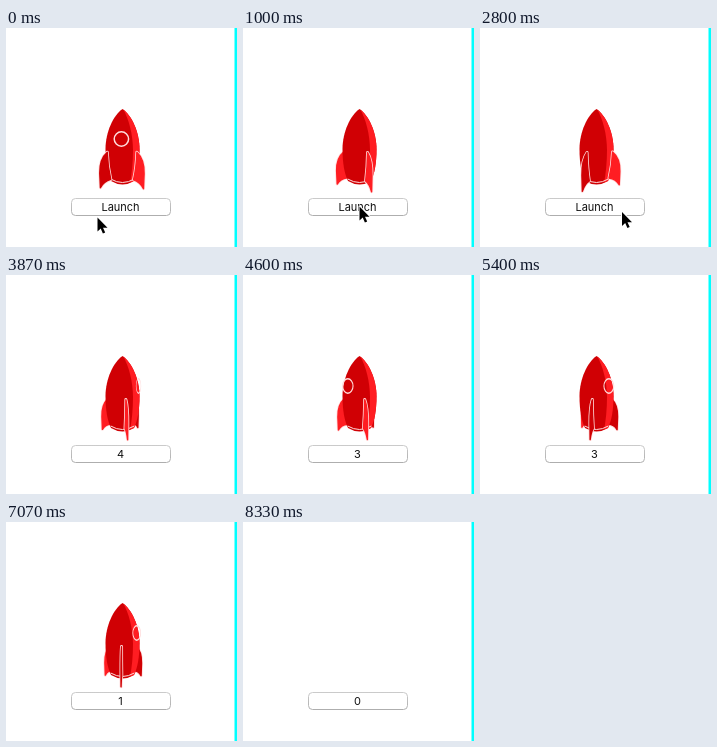
An HTML page with a canvas for the animation above (9340 ms loop, 231 by 219 pixels).

```html
<!DOCTYPE html>
<html>
<head>
<meta charset="utf-8">
<style>
html, body { margin: 0; width: 100%; height: 100%; overflow: hidden; background: #fff; }
canvas { display: block; }
</style>
</head>
<body>
<canvas id="stage" width="231" height="219"></canvas>
<script>
const ctx = document.getElementById('stage').getContext('2d');
const LOOP = 9340, FPS = 15;
const CX = 116.5, EYE = 120, DEPTH = 121;
const DARK = '#d00004', BRIGHT = '#ff1d22', EDGE = '#ffdcdc';
const SPIN = 1.625, SPIN_LAG = 0.118;
const PRESS = 2.42, CLICK = 2.55, LIFTOFF = 7.55, GONE = 8.33;

// cubic-bezier(.42, 0, .58, 1)
function easeInOut(x) {
  let lo = 0, hi = 1, s = 0.5;
  for (let i = 0; i < 24; i++) {
    s = (lo + hi) / 2;
    const bx = 3 * (1 - s) * (1 - s) * s * 0.42 + 3 * (1 - s) * s * s * 0.58 + s * s * s;
    if (bx < x) lo = s; else hi = s;
  }
  return s * s * (3 - 2 * s);
}

function spinAngle(t) {
  const u = (((t - SPIN_LAG) / SPIN) % 1 + 1) % 1;
  return easeInOut(u) * 2 * Math.PI;
}

// Perspective view of a point at radius r, height y, turned by a
function project(r, y, a) {
  const s = 1 / (1 - r * Math.cos(a) / DEPTH);
  return [CX + r * Math.sin(a) * s, EYE + (y - EYE) * s];
}

function drawFin(a) {
  const p = (r, y) => project(r, y, a);
  const facing = Math.sin(a) > 0 ? -Math.cos(a) : Math.cos(a);
  const color = facing < 0.15 ? BRIGHT : DARK;
  ctx.beginPath();
  ctx.moveTo(...p(16, 124));
  ctx.quadraticCurveTo(...p(23.5, 130), ...p(23.2, 143));
  ctx.lineTo(...p(22.6, 156.5));
  ctx.quadraticCurveTo(...p(19.5, 151), ...p(12.5, 150));
  ctx.quadraticCurveTo(...p(15.5, 138), ...p(16, 124));
  ctx.closePath();
  ctx.lineJoin = 'round';
  ctx.strokeStyle = EDGE;
  ctx.lineWidth = 3;
  ctx.stroke();
  ctx.strokeStyle = ctx.fillStyle = color;
  ctx.lineWidth = 1.4;
  ctx.stroke();
  ctx.fill();
}

function bodyPath() {
  ctx.beginPath();
  ctx.moveTo(CX, 81);
  ctx.bezierCurveTo(CX + 9, 87, CX + 17, 104, CX + 17, 121);
  ctx.bezierCurveTo(CX + 17, 135, CX + 15, 146, CX + 11.5, 153);
  ctx.quadraticCurveTo(CX, 160, CX - 11.5, 153);
  ctx.bezierCurveTo(CX - 15, 146, CX - 17, 135, CX - 17, 121);
  ctx.bezierCurveTo(CX - 17, 104, CX - 9, 87, CX, 81);
  ctx.closePath();
}

function drawBody() {
  ctx.save();
  bodyPath();
  ctx.fillStyle = DARK;
  ctx.fill();
  ctx.clip();
  ctx.beginPath();
  ctx.moveTo(CX, 80);
  ctx.bezierCurveTo(CX + 6, 90, CX + 10.5, 106, CX + 10.5, 122);
  ctx.quadraticCurveTo(CX + 10.5, 142, CX + 6.5, 160);
  ctx.lineTo(CX + 24, 160);
  ctx.lineTo(CX + 24, 80);
  ctx.fillStyle = BRIGHT;
  ctx.fill();
  ctx.restore();
  ctx.beginPath();
  ctx.moveTo(CX - 11.8, 151);
  ctx.quadraticCurveTo(CX, 158, CX + 11.8, 151);
  ctx.strokeStyle = EDGE;
  ctx.lineWidth = 1;
  ctx.stroke();
}

function drawWindow(a) {
  const c = Math.cos(a);
  if (c < 0.05) return;
  ctx.save();
  ctx.translate(CX + 17 * Math.sin(a), 111);
  ctx.scale(c, 1);
  ctx.beginPath();
  ctx.arc(0, 0, 7.2, 0, 2 * Math.PI);
  ctx.strokeStyle = EDGE;
  ctx.lineWidth = 1.5;
  ctx.stroke();
  ctx.restore();
}

function drawRocket(t) {
  if (t >= GONE) return;
  const rise = t > LIFTOFF ? 84 * Math.pow((t - LIFTOFF) / 0.45, 1.25) : 0;
  const turn = spinAngle(t);
  const fins = [1, 3, 5].map(i => turn + i * Math.PI / 3)
    .sort((a, b) => Math.cos(a) - Math.cos(b));
  const behind = a => Math.cos(a) < -0.02;
  ctx.save();
  ctx.translate(0, -rise);
  fins.filter(behind).forEach(drawFin);
  drawBody();
  drawWindow(turn);
  fins.filter(a => !behind(a)).forEach(drawFin);
  ctx.restore();
}

function drawButton(t) {
  const pressed = t >= PRESS && t < CLICK;
  const ticks = Math.floor(t - CLICK);
  const label = ticks < 1 ? 'Launch' : String(Math.max(0, 5 - ticks));
  const border = ctx.createLinearGradient(0, 170, 0, 188);
  border.addColorStop(0, pressed ? '#4a9cf5' : '#cbcbcb');
  border.addColorStop(1, pressed ? '#0a55d0' : '#adadad');
  ctx.beginPath();
  ctx.roundRect(65.5, 170.5, 99, 17, 4);
  ctx.fillStyle = pressed ? '#2f86f3' : '#fff';
  ctx.fill();
  ctx.strokeStyle = border;
  ctx.lineWidth = 1;
  ctx.stroke();
  ctx.fillStyle = pressed ? '#fff' : '#111';
  ctx.font = '11px Inter, "Open Sans", sans-serif';
  ctx.textAlign = 'center';
  ctx.fillText(label, 114.5, 183);
}

// time, x, y of the pointer tip
const POINTER = [
  [0, 91.5, 189.5], [0.25, 92, 189], [0.9, 116.5, 178.5], [1.1, 116.5, 178.5],
  [1.6, 117.5, 180], [2.65, 118, 180.5], [2.8, 142, 184], [2.87, 211, 190]
];

function drawPointer(t) {
  if (t > 2.9) return;
  let i = 0;
  while (i < POINTER.length - 2 && t > POINTER[i + 1][0]) i++;
  const [t0, x0, y0] = POINTER[i], [t1, x1, y1] = POINTER[i + 1];
  const u = Math.min(1, (t - t0) / (t1 - t0));
  const k = u * u * (3 - 2 * u);
  ctx.save();
  ctx.translate(x0 + (x1 - x0) * k, y0 + (y1 - y0) * k);
  ctx.beginPath();
  [[0, 0], [0, 14], [3.2, 11], [5.4, 16], [7.7, 15], [5.5, 10.2], [10, 10.2]]
    .forEach(p => ctx.lineTo(...p));
  ctx.closePath();
  ctx.lineJoin = 'round';
  ctx.strokeStyle = '#fff';
  ctx.lineWidth = 2;
  ctx.stroke();
  ctx.fillStyle = '#000';
  ctx.fill();
  ctx.restore();
}

const start = performance.now();
function frame() {
  const ms = (performance.now() - start) % LOOP;
  const t = Math.floor((ms + 5) * FPS / 1000) / FPS;
  ctx.fillStyle = '#fff';
  ctx.fillRect(0, 0, 231, 219);
  ctx.fillStyle = '#0ff';
  ctx.fillRect(228.5, 0, 2.5, 219);
  drawRocket(t);
  drawButton(t);
  drawPointer(t);
  requestAnimationFrame(frame);
}
frame();
</script>
</body>
</html>
```
